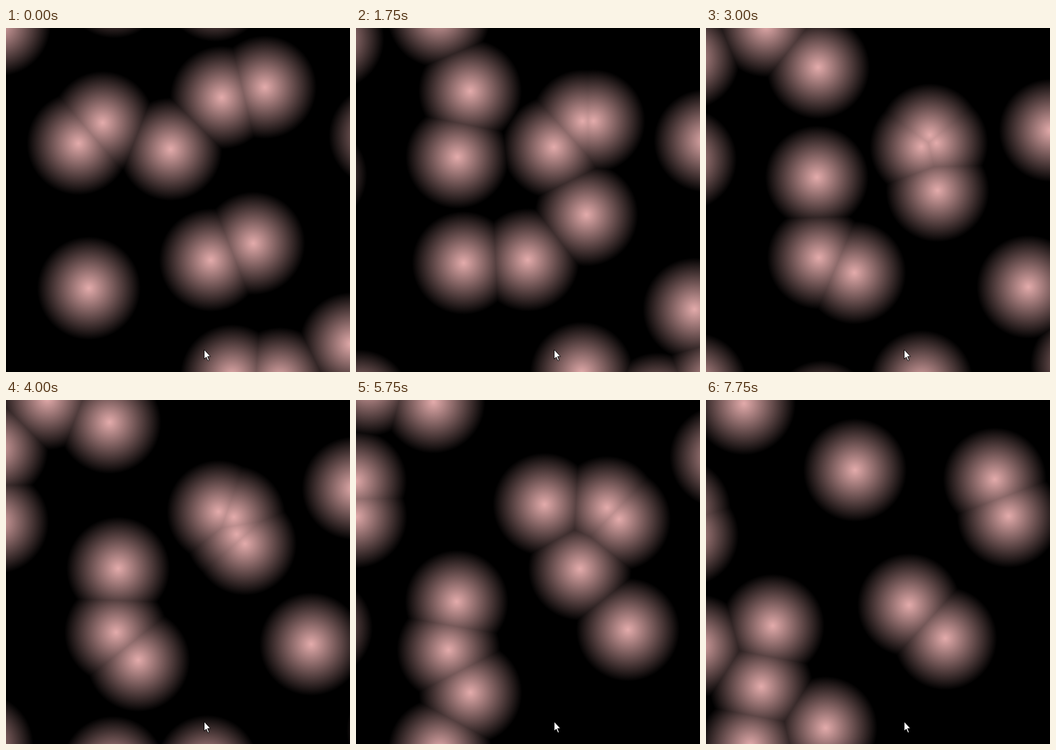
An HTML page that plays this animation: 598 px wide and 599 px high, repeating every 8 s.

```html
<!DOCTYPE html>
<html lang="en">
<head>
<meta charset="utf-8">
<title>Drifting glows</title>
<style>
  html, body { margin: 0; width: 100%; height: 100%; overflow: hidden; background: #000; }
  svg { display: block; width: 598px; height: 599px; isolation: isolate; }
  #balls circle { mix-blend-mode: lighten; }
</style>
</head>
<body>
<svg viewBox="0 0 598 599" xmlns="http://www.w3.org/2000/svg">
  <defs>
    <radialGradient id="glow">
      <stop offset="0" stop-color="#e3abab"/>
      <stop offset="1" stop-color="#000"/>
    </radialGradient>
  </defs>
  <rect width="598" height="599" fill="#000"/>
  <g id="balls"></g>
  <path d="M344.5 560v16.5l3.5-3.5 3 6.5 2.2-1-2.7-6.5h5z" fill="#fff" stroke="#000"/>
</svg>
<script>
const LOOP = 8, STEP = 0.25, END = LOOP - STEP, RADIUS = 90;
const layer = document.getElementById('balls');
const balls = [];

// A ball drifts on one smooth curve through a few points evenly spaced in time.
function ball(points, from = 0, to = END) {
  const el = document.createElementNS('http://www.w3.org/2000/svg', 'circle');
  el.setAttribute('r', RADIUS);
  el.setAttribute('fill', 'url(#glow)');
  layer.appendChild(el);
  balls.push({ el, points, from, to });
}

// Balls that stay for the whole loop
ball([[168, 165], [198, 82], [152, 12], [66, 6]]);
ball([[126, 201], [189, 247], [185, 333], [116, 393]]);
ball([[286, 211], [365, 207], [422, 195], [502, 138]]);
ball([[375, 121], [399, 187], [395, 274], [353, 357]]);
ball([[450, 103], [397, 180], [343, 190], [259, 122]]);
ball([[430, 375], [400, 297], [441, 219], [526, 202]]);
ball([[356, 404], [271, 417], [206, 490], [208, 571]]);
ball([[144, 453], [195, 401], [174, 422], [96, 499]]);
ball([[600, 550], [571, 463], [492, 405], [416, 415]]);
ball([[651, 188], [600, 186], [622, 118], [698, 35]]);
ball([[-12, -6], [-36, 40], [-3, 123], [-47, 190]]);
ball([[188, -72], [118, -8], [37, -15], [-8, -95]]);
ball([[-125, 300], [-47, 237], [-2, 203], [-33, 235]]);

// Balls that leave or enter the stage
ball([[393, 606], [377, 614], [284, 701]], 0, 5.75);
ball([[30, 700], [-16, 623], [-93, 574]], 0, 5.75);
ball([[590, 690], [638, 599], [705, 575]], 0, 4.75);
ball([[476, 611], [572, 699]], 0, 3.5);
ball([[363, -66], [377, -116]], 0, 2);
ball([[212, 715], [171, 624], [77, 602]], 1.75);
ball([[-130, 385], [-57, 398], [-14, 428]], 4);

const mix = (a, b, u) => a + (b - a) * u;

// Neville interpolation, u from 0 at the first point to 1 at the last
function along(points, u) {
  const n = points.length - 1, s = u * n;
  let row = points;
  for (let k = 1; k <= n; k++) {
    row = row.slice(1).map(([x, y], i) =>
      [mix(row[i][0], x, (s - i) / k), mix(row[i][1], y, (s - i) / k)]);
  }
  return row[0];
}

function draw(t) {
  for (const { el, points, from, to } of balls) {
    const shown = t >= from && t <= to;
    el.setAttribute('visibility', shown ? 'visible' : 'hidden');
    if (!shown) continue;
    const [x, y] = along(points, (t - from) / (to - from));
    el.setAttribute('cx', x.toFixed(1));
    el.setAttribute('cy', y.toFixed(1));
  }
}

let start = null, last = -1;
function tick(now) {
  if (start === null) start = now;
  const t = Math.floor(((now - start) / 1000 % LOOP) / STEP) * STEP;
  if (t !== last) draw(last = t);
  requestAnimationFrame(tick);
}
draw(0);
requestAnimationFrame(tick);
</script>
</body>
</html>
```
